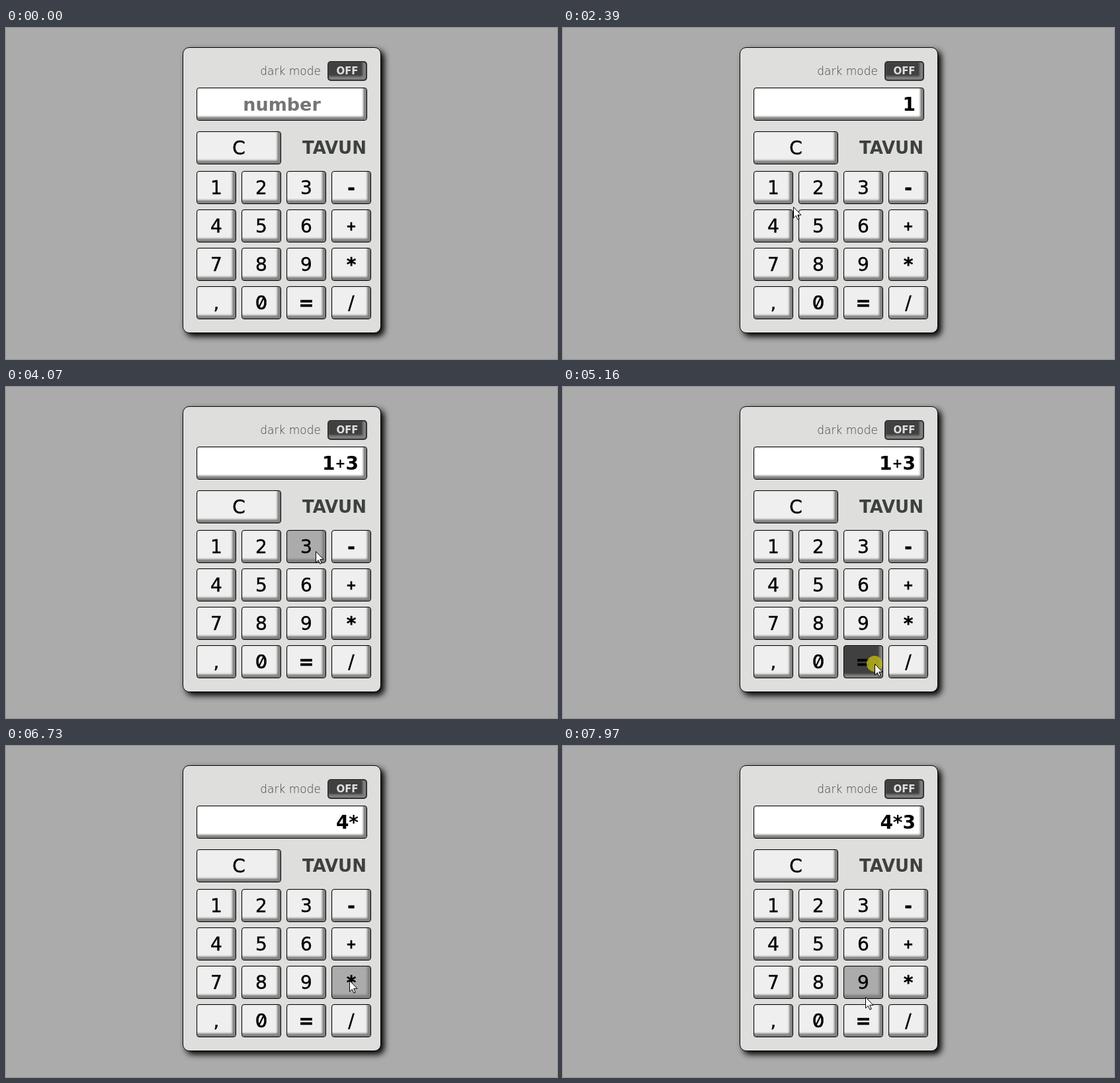
These frames come from a looping animation (833x500 px, 8000 ms). An HTML page:

```html
<!DOCTYPE html>
<html lang="en">
<head>
<meta charset="utf-8">
<title>Calculator</title>
<style>
  html, body { margin: 0; width: 100%; height: 100%; overflow: hidden; background: #ababab; }
  body { position: relative; font: 28px "DejaVu Sans", sans-serif; }
  div, svg { position: absolute; box-sizing: border-box; }
  .body { border: 1px solid #000; border-radius: 10px; background: #dedfdc; box-shadow: 5px 5px 10px #000; }
  .key, .screen, .switch {
    display: flex; align-items: center; justify-content: center; white-space: pre;
    border: 1px solid #000; border-radius: 4px; background: #efefef;
    box-shadow: inset -3px -3px 3px 2px #808080;
  }
  .key { -webkit-text-stroke: .4px; }
  .hover { background: #ababab; }
  .down { background: #404040; }
  .zero { font: 500 28px Inter, sans-serif; font-feature-settings: "zero"; }
  .op, small { font-weight: bold; }
  small { font-size: 19px; }
  .screen { justify-content: flex-end; padding-right: 12px; background: #fff; font-weight: bold; }
  .screen.empty { justify-content: center; padding: 0; color: #757575; font-size: 27px; }
  .switch { border: 2px solid #333; border-radius: 5px; background: #404040; color: #e0e0e0; font: bold 15px "DejaVu Sans", sans-serif; }
  .label { display: flex; align-items: center; justify-content: flex-end; color: #3d413d; white-space: pre; }
  .mode { font-size: 17px; font-weight: 200; }
  .brand { font-size: 26px; font-weight: bold; }
  svg { left: 0; top: 0; width: 833px; height: 500px; }
</style>
</head>
<body>
<script>
const LOOP = 8000, PRESS = 60;

// [first change, last change, steps, control x, y, end x, y]
const moves = [
  [640, 850, 4, 575, 445, 471, 418],
  [1060, 1730, 11, 289, 256, 343, 261],
  [2390, 3150, 12, 368, 318, 519, 316],
  [3270, 3870, 10, 500, 270, 468, 248],
  [4140, 4770, 11, 464, 330, 471, 418],
  [5650, 6130, 8, 460, 320, 516, 316],
  [6330, 6400, 2, 517, 336, 519, 354],
  [6800, 7360, 9, 500, 270, 466, 250],
  [7560, 7970, 7, 456, 310, 457, 379],
];
const clicks = [[2060, '1'], [3210, '1+'], [4010, '1+3'], [5160, '4'], [6600, '4*'], [7430, '4*3']];

const markup = s => s.replace('+', '<small>+</small>');

function box(cls, x, y, w, h, text = '') {
  const el = document.createElement('div');
  el.className = cls;
  el.style.cssText = `left:${x}px;top:${y}px;width:${w}px;height:${h}px`;
  el.innerHTML = markup(text);
  document.body.append(el);
  return el;
}

box('body', 267, 29, 300, 432);
box('label mode', 370, 50, 106, 30, 'dark mode');
box('switch', 486, 50, 60, 30, 'OFF');
const screen = box('screen', 288, 90, 258, 50);
box('key', 288, 156, 128, 50, 'C');
box('label brand', 420, 156, 125, 50, 'TAVUN');

const keys = [...'123-456+789*,0=/'].map((c, i) => {
  const x = 288 + i % 4 * 68, y = 216 + (i >> 2) * 58;
  const cls = 'key' + (c === '0' ? ' zero' : '-+*='.includes(c) ? ' op' : '');
  return { x, y, cls, el: box(cls, x, y, 60, 50, c) };
});

document.body.insertAdjacentHTML('beforeend', `<svg><g id="pointer">
  <circle id="spot" r="12" fill="rgba(190,185,20,.8)"/>
  <path d="M.5.5V17L4.3 13.4 6.8 19.2 9.2 18.2 6.8 12.4H12Z" fill="#fff" stroke="#000"/>
</g></svg>`);
const pointer = document.getElementById('pointer');
const spot = document.getElementById('spot');

function pointerAt(t) {
  let x = 679, y = 471;
  for (const [start, end, steps, cx, cy, ex, ey] of moves) {
    if (t < start) break;
    const step = Math.floor((t - start) / (end - start) * (steps - 1) + .001) + 1;
    const u = Math.min(1, step / steps), v = 1 - u;
    x = v * v * x + 2 * u * v * cx + u * u * ex;
    y = v * v * y + 2 * u * v * cy + u * u * ey;
  }
  return [x, y];
}

function draw(t) {
  const [x, y] = pointerAt(t);
  const pressed = clicks.some(([at]) => t >= at && t < at + PRESS);
  const done = clicks.filter(([at]) => t >= at + PRESS).pop();

  screen.className = done ? 'screen' : 'screen empty';
  screen.innerHTML = markup(done ? done[1] : 'number');
  pointer.style.display = t < moves[0][0] ? 'none' : '';
  pointer.setAttribute('transform', `translate(${Math.round(x)} ${Math.round(y)})`);
  spot.style.display = pressed ? '' : 'none';

  for (const k of keys) {
    const over = x >= k.x && x < k.x + 60 && y >= k.y && y < k.y + 50;
    k.el.className = k.cls + (over ? pressed ? ' down' : ' hover' : '');
  }
}

const begin = performance.now();
function frame() {
  draw((performance.now() - begin) % LOOP);
  requestAnimationFrame(frame);
}
frame();
</script>
</body>
</html>
```
